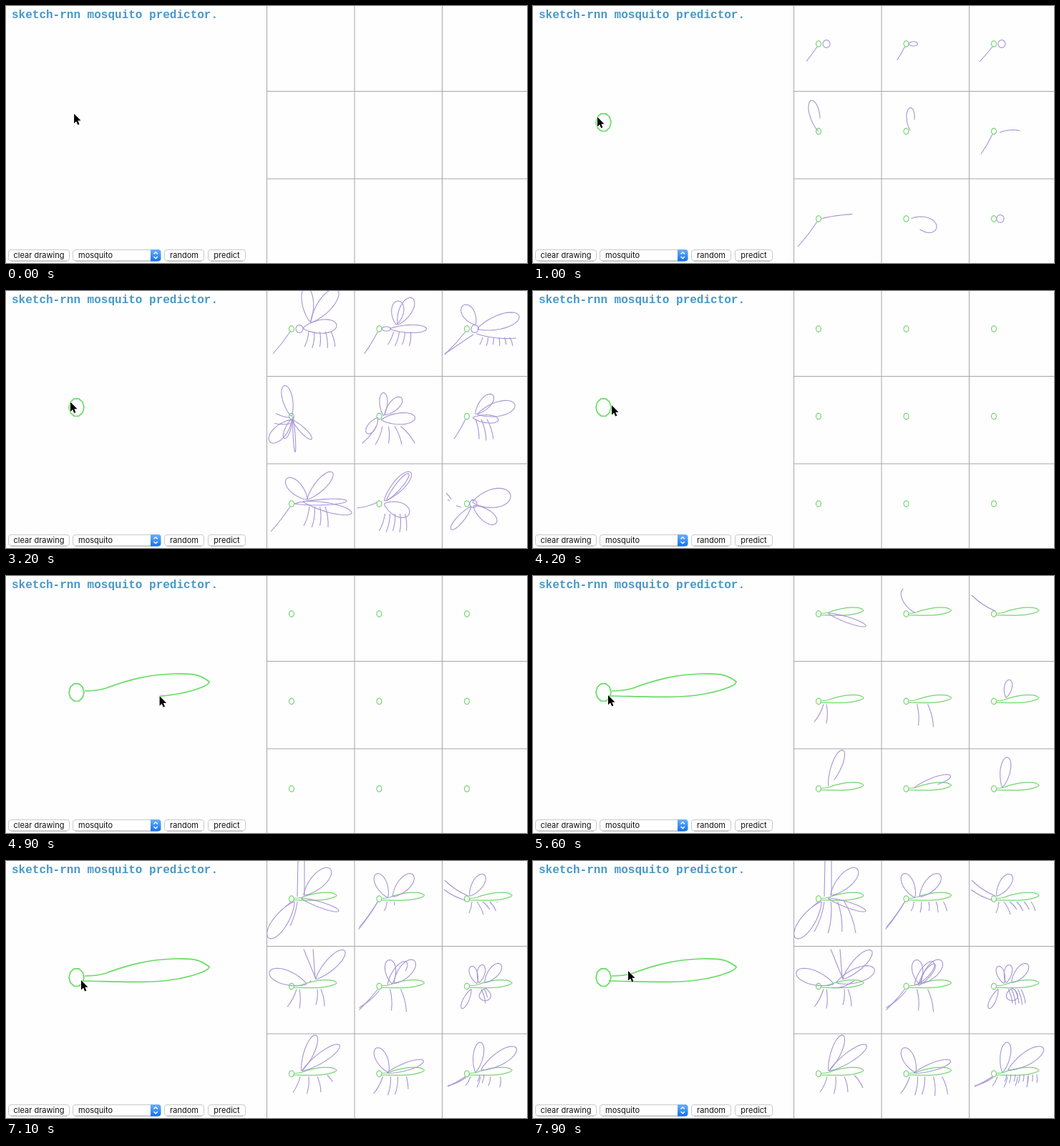
These frames come from a looping animation (728 px wide and 360 px high, 8 s). An HTML page:

```html
<!DOCTYPE html>
<html lang="en">
<head>
<meta charset="utf-8">
<title>Mosquito predictor</title>
<style>
  html, body { margin: 0; width: 100%; height: 100%; overflow: hidden; background: #fefefe; }
  svg { display: block; }
  path { stroke-linejoin: round; }
  .ink { fill: none; stroke: #68dc64; stroke-width: 1.7; }
  .mini { fill: none; stroke: #74d570; stroke-width: 1.1; vector-effect: non-scaling-stroke; }
  .guess { fill: none; stroke: #a595d4; stroke-width: 1.1; }
  .grid { stroke: #a6a6a6; }
  .title { font: bold 16px "Liberation Mono", monospace; fill: #4798c8; }
  .label { font: 11px Inter, "Open Sans", sans-serif; fill: #111; }
  .button { fill: #fff; stroke: #c9c9c9; }
  .shade { stroke: #b0b0b0; }
</style>
</head>
<body>
<svg width="728" height="360" viewBox="0 0 728 360">
  <defs>
    <linearGradient id="blue" x2="0" y2="1">
      <stop stop-color="#6bb1fa"/><stop offset="1" stop-color="#1470f2"/>
    </linearGradient>
  </defs>
  <text class="title" x="8" y="17">sketch-rnn mosquito predictor.</text>
  <path class="grid" d="M364.5 0V360M487 0V360M609.5 0V360M364 119.5H728M364 242H728"/>
  <g id="controls"></g>
  <path d="M202 341h10.500a4 4 0 0 1 4 4v8.500a4 4 0 0 1-4 4h-10.500z" fill="url(#blue)"/>
  <path d="M206.500 347.500l2.700-2.800 2.700 2.800M206.500 351l2.700 2.800 2.700-2.800" fill="none" stroke="#fff" stroke-width="1.300"/>
  <g id="drawing"></g>
  <path id="cursor" d="M0 0V13.500L3.100 10.600 5.200 15.500 7.400 14.500 5.300 9.700H9.500Z" stroke="#fff" stroke-width="1.200" paint-order="stroke"/>
</svg>
<script>
const LOOP = 8000, STEP = 100;
const CLEAR = 4200, HEAD_DONE = 700, BODY_DONE = 5200;
const PITCH = 122.5, MINI = "scale(.34) translate(-98.5 -163)";
const $ = id => document.getElementById(id);
const clamp = v => Math.max(0, Math.min(1, v));
const mix = (a, b, k) => a + (b - a) * k;
const polyline = (n, point) => "M" + Array.from({ length: n }, (_, i) => point(i)).join("L");

function add(parent, tag, attrs, text = "") {
  const el = document.createElementNS("http://www.w3.org/2000/svg", tag);
  for (const name in attrs) el.setAttribute(name, attrs[name]);
  el.textContent = text;
  return parent.appendChild(el);
}

function button(x, width, text, textX) {
  const g = $("controls");
  add(g, "rect", { class: "button", x: x + 0.5, y: 341.5, width: width - 1, height: 15.5, rx: 3.5 });
  add(g, "path", { class: "shade", d: `M${x + 4} 357.300H${x + width - 4}` });
  add(g, "text", textX ? { class: "label", x: textX, y: 353 }
    : { class: "label", x: x + width / 2, y: 353, "text-anchor": "middle" }, text);
}
button(3, 86, "clear drawing");
button(93, 123, "mosquito", 101);
button(221, 56, "random");
button(282, 53, "predict");

// Mosquito parts, measured from the centre of the small head

// Closed loop from a root to a tip and back, pointed at the root
function wing(x, y, tipX, tipY, width, taper = 0.6) {
  const dx = tipX - x, dy = tipY - y, length = Math.hypot(dx, dy);
  const side = 0.6 * (width ?? Math.min(20, 0.42 * length)) / length;
  return polyline(33, i => {
    const a = i / 32 * 2 * Math.PI;
    const u = (1 - Math.cos(a)) / 2;
    const v = side * Math.sin(a) * Math.abs(Math.sin(a / 2)) ** taper;
    return [x + dx * u + dy * v, y + dy * u - dx * v];
  });
}
const ring = x => wing(x - 5, 0, x + 5, 0, 9, 0);

function line(x, y, tipX, tipY, bend = 0.1) {
  const dx = tipX - x, dy = tipY - y;
  return `M${x} ${y}Q${x + dx / 2 + dy * bend} ${y + dy / 2 - dx * bend} ${tipX} ${tipY}`;
}
const trunk = (tipX, tipY) => line(-2, 4, tipX, tipY, 0.04);

// Row of legs spread from [x0, x1] on the body to [tip0, tip1] at the ground
const legs = (n, x0, x1, tip0, tip1, ground, y = 4) => Array.from({ length: n }, (_, i) => {
  const k = i / (n - 1);
  return line(mix(x0, x1, k), y, mix(tip0, tip1, k), ground + (i % 2) * 2);
});

const drawing = $("drawing");
const cursor = $("cursor");
const headPath = polyline(12, i => {
  const a = -1.9 - i * Math.PI / 5;
  return [98.5 + 10.5 * Math.cos(a), 163 + 12.8 * Math.sin(a)];
});
const bodyPath = "M110 161Q128 161 140 157C172 145 200 138 235 137S274 141 284 148C284 154 258 163 228 167S160 169 106 168";
const head = add(drawing, "path", { class: "ink", d: headPath });
const body = add(drawing, "path", { class: "ink", d: bodyPath });
const cells = Array.from({ length: 9 }, (_, i) => add(drawing, "g", {
  transform: `translate(${399 + i % 3 * PITCH} ${53 + Math.floor(i / 3) * PITCH})`
}));
const minis = [headPath, bodyPath].map(d =>
  cells.map(cell => add(cell, "path", { class: "mini", d, transform: MINI })));

function reveal(path, share) {
  const length = path.getTotalLength();
  path.style.display = share > 0 ? "" : "none";
  path.style.strokeDasharray = share < 1 ? `${share * length} ${length}` : "none";
}

// marks: how many strokes are finished at each inner time of the schedule
const guesses = [];
function predict(times, gone, cell, marks, parts) {
  const paths = parts.flat().map(d => add(cells[cell], "path", { class: "guess", d }));
  const lengths = paths.map(p => p.getTotalLength());
  const inkAt = [0, ...marks, paths.length].map(count =>
    lengths.reduce((sum, length, i) => sum + length * clamp(count - i), 0));
  guesses.push({ times, gone, paths, lengths, inkAt });
}
const fromHead = (cell, mark, ...parts) =>
  predict([HEAD_DONE, 2000, 3200], CLEAR, cell, [mark], parts);
const fromBody = (cell, marks, ...parts) =>
  predict([BODY_DONE, 5600, 6500, 7600], LOOP, cell, marks, parts);

fromHead(0, 3.55, ring(11), trunk(-26, 35), wing(16, -1, 63, -5, 19), wing(27, -9, 64, -55),
  wing(26, -10, 20, -58, 16), legs(5, 24, 55, 18, 61, 25));
fromHead(1, 3.5, wing(4, 0, 16, 0, 5, 0), trunk(-21, 35), wing(15, 0, 66, 0, 11), wing(26, -6, 46, -43),
  wing(24, -6, 27, -39, 17), legs(4, 20, 44, 12, 42, 22));
fromHead(2, 4.6, ring(11), trunk(-31, 36), line(9, 8, -31, 35, 0), line(13, 7, 69, 13, -0.1), wing(15, 0, 73, -18),
  wing(12, -6, -5, -33, 17), legs(6, 22, 60, 18, 64, 22, 12));
fromHead(3, 4, wing(0, 0, -10, -43, 14), wing(2, 0, 5, 50, 3), wing(0, 4, -10, 31, 8), wing(1, 5, 28, 32, 8),
  wing(0, 5, -30, 36), line(-2, 2, -22, -4), line(0, 10, -24, 10));
fromHead(4, 3, wing(6, -1, 6, -33, 11), wing(3, 5, 50, 2, 16), wing(-2, 2, -17, 24),
  wing(8, -2, 31, -26), legs(5, -4, 30, -24, 50, 38, 14));
fromHead(5, 5.55, trunk(-18, 32), wing(8, 2, 44, 5, 11), legs(3, 12, 28, 17, 37, 32), wing(15, -3, 67, -16),
  wing(12, -3, 36, -30));
fromHead(6, 3.4, trunk(-29, 39), wing(4, 0, 77, -4, 8), wing(16, -3, 84, 13, 13), wing(22, -6, 57, -44, 15),
  wing(22, -6, -7, -35), legs(4, 25, 47, 17, 51, 31));
fromHead(7, 3, wing(7, 0, 42, 14, 20), wing(7, -4, 44, -44, 16), wing(10, -4, 41, -42, 9),
  line(-3, -2, -31, 6), legs(5, 8, 36, 0, 38, 38, 14));
fromHead(8, 4, ring(9), wing(6, 4, -22, 36, 10), line(-29, -15, -22, -6), line(7, -4, 8, -7),
  wing(8, -2, 61, -12, 26), wing(9, 3, 41, 27), line(-27, -6, -24, -4), line(-15, 3, -8, 5));

fromBody(0, [1, 5], wing(13, -1, 66, 17, 8),
  line(8, -3, 9, -56, 0), line(18, -5, 18, -56, 0), wing(17, -5, 54, -42), line(-1, 4, -9, 11),
  wing(4, 4, -32, 55), legs(4, 8, 36, -6, 52, 46));
fromBody(1, [0.5, 3], wing(12, -2, -4, -35),
  wing(19, -3, 47, -34), trunk(-29, 43),
  trunk(-28, 40), legs(5, 11, 52, 7, 57, 17));
fromBody(2, [1, 5], line(2, -4, -31, -26),
  line(-2, 2, -32, -13), wing(4, -4, 24, -34), legs(2, 7, 14, 3, 23, 20),
  legs(4, 22, 52, 32, 58, 15));
fromBody(3, [2, 6.5], legs(2, 7, 11, -6, 11, 29),
  line(34, -10, 17, -52, 0), line(33, -12, 30, -52, 0), legs(2, 36, 41, 34, 46, 26), wing(34, -10, 74, -50, 16),
  wing(21, -3, -31, -20), wing(25, -5, 78, -24), line(18, 2, 50, -8, -0.2));
fromBody(4, [2, 4], legs(2, 15, 30, 17, 38, 34),
  wing(18, -4, 14, -37, 15), wing(21, -4, 49, -36),
  trunk(-28, 33), line(0, 6, -28, 30), wing(12, -2, 38, -34, 14), wing(17, -1, 40, -31, 10));
fromBody(5, [1, 4], wing(17, -5, 22, -30),
  wing(25, -5, 47, -31), wing(6, 4, -7, 31, 8), wing(26, 3, 25, 20, 16),
  wing(14, -4, 6, -28), legs(5, 20, 38, 26, 44, 24));
fromBody(6, [0.9, 5], wing(14, -4, 34, -54, 14),
  wing(15, -4, 67, -40, 14), legs(3, 12, 36, 2, 41, 26),
  line(50, 2, 62, 20));
fromBody(7, [0.7, 4], wing(11, -1, 62, -18, 11),
  wing(13, -2, -4, -36), legs(2, 5, 16, -8, 12, 28),
  legs(3, 26, 50, 22, 58, 29));
fromBody(8, [1, 6], wing(12, -2, 19, -44, 14),
  wing(20, -5, 69, -36, 18), legs(4, 5, 47, -2, 46, 17),
  trunk(-27, 18), line(-1, 5, -27, 17), legs(8, 18, 60, 15, 60, 11, 1));

function drawGuess({ times, gone, paths, lengths, inkAt }, t) {
  let ink = 0;
  for (let i = 1; i < times.length; i++)
    ink += (inkAt[i] - inkAt[i - 1]) * clamp((t - times[i - 1]) / (times[i] - times[i - 1]));
  if (t >= gone) ink = 0;
  paths.forEach((path, i) => {
    reveal(path, clamp(ink / lengths[i]));
    ink = Math.max(0, ink - lengths[i]);
  });
}

function cursorAt(t, headShare, bodyShare) {
  const glide = (a, b, from, to) => a.map((v, i) => mix(v, b[i], clamp((t - from) / (to - from))));
  const along = (path, share) => {
    const p = path.getPointAtLength(path.getTotalLength() * share);
    return [p.x, p.y];
  };
  if (t < HEAD_DONE) return along(head, headShare);
  if (t <= CLEAR) return glide([90, 155.5], [110, 160], 3600, 4000);
  if (t < BODY_DONE) return along(body, bodyShare);
  return glide([105, 167], [133, 154], 7700, 7900);
}

function frame(now) {
  const t = Math.floor(now % LOOP / STEP) * STEP;
  const headShare = clamp((t - 100) / (HEAD_DONE - 100));
  const bodyShare = clamp((t - CLEAR) / (BODY_DONE - CLEAR));
  reveal(head, headShare);
  reveal(body, bodyShare);
  for (const mini of minis[0]) reveal(mini, +(t >= HEAD_DONE));
  for (const mini of minis[1]) reveal(mini, +(t >= BODY_DONE));
  for (const guess of guesses) drawGuess(guess, t);
  cursor.setAttribute("transform", `translate(${cursorAt(t, headShare, bodyShare)})`);
  requestAnimationFrame(frame);
}
requestAnimationFrame(frame);
</script>
</body>
</html>
```
